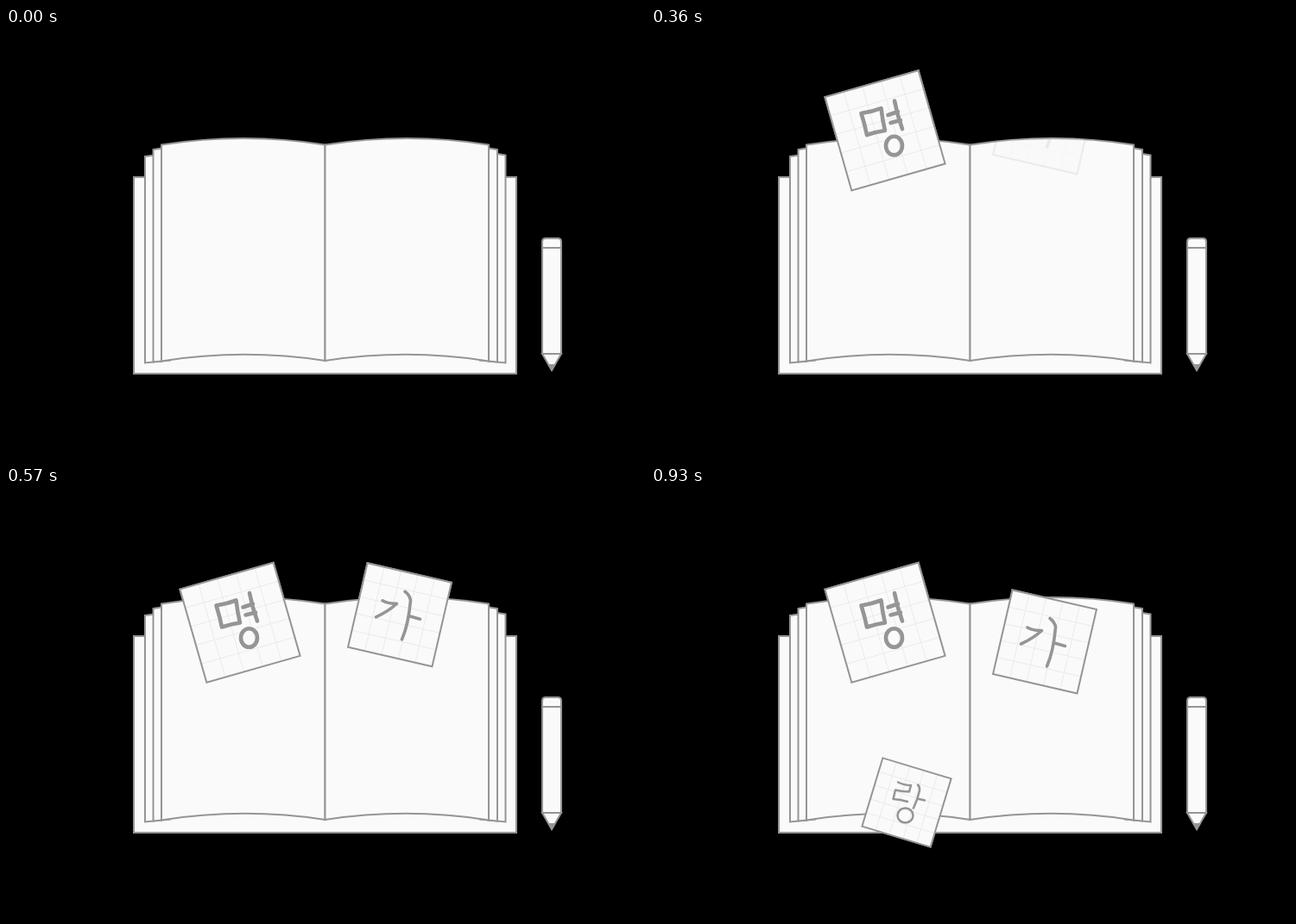
Recreate the animation shown at these times as an HTML page with a canvas. Size 740 by 500 pixels, loop 1620 ms.

```html
<!DOCTYPE html>
<html>
<head>
<meta charset="utf-8">
<style>
html, body { margin: 0; width: 100%; height: 100%; overflow: hidden; background: #000; }
canvas { display: block; }
</style>
</head>
<body>
<canvas id="stage" width="740" height="500"></canvas>
<script>
const ctx = document.getElementById('stage').getContext('2d');
const INK = '#959595', PAPER = '#fafafa', GRID = '#ebebeb';
const LOOP = 1620, STEP = 30, FADE = 110;

const easeIn = u => u ** 1.33;
const easeOut = u => Math.sin(u * Math.PI / 2);

// Each note drops by `drop` pixels between `from` and `to`; glyphs are in resting coordinates.
const notes = [
  { x: 271, y: 157.25, size: 112.6, turn: -15.95, from: 45, to: 570, drop: 78, ease: easeIn,
    pen: 4.6, glyph: 'M243.5 137.5Q256 135.5 266.5 131.5Q268 145 271 157.5Q260 159 250 162.5Q247.5 150 243.5 137.5Z' +
      'M282 123Q285 139 291 155.5M274.5 139.5L286 135.5M277.5 148.5L289 145.5' +
      'M272 175a9.5 10.8 0 1 0 19 0a9.5 10.8 0 1 0 -19 0' },
  { x: 456, y: 179.5, size: 100, turn: 13, from: 345, to: 925, drop: 73, ease: easeOut,
    pen: 3.6, glyph: 'M436 163Q443 167 452.5 166.5Q443 175.5 428.5 182' +
      'M462 152.5Q468 157 468.5 163Q466 191 458.5 208M467 181L479.5 184.5' },
  { x: 296, y: 366, size: 82.8, turn: 16.85, from: 590, to: 930, drop: 40, ease: easeOut,
    pen: 2.5, glyph: 'M286 342.5Q293 346 301 346L299 353.5Q291 353.5 283 351.5L280.5 362Q289 362.5 297 365' +
      'M309 345.5Q311.5 348 311 352Q309 362 304 372.5M308.5 361.5L317 363.5' +
      'M285.5 381a9 8.5 0 1 0 18 0a9 8.5 0 1 0 -18 0' }
];
for (const n of notes) n.path = new Path2D(n.glyph);

function shape(d, fill = PAPER) {
  const p = new Path2D(d);
  ctx.fillStyle = fill;
  ctx.fill(p);
  ctx.strokeStyle = INK;
  ctx.lineWidth = 2;
  ctx.stroke(p);
}

function drawBook() {
  shape('M148 173H591V401H148Z');
  shape('M161 149L180 146.5V386.5L161 388.5Z');
  shape('M578.5 147.5L559 144.5V386.5L578.5 388.5Z');
  shape('M170.5 141L190 138V385.5L170.5 387.5Z');
  shape('M569 141L549 138V385.5L569 387.5Z');
  shape('M180 135.5Q275 120.5 369.5 135.5V386Q275 371.5 180 386.5Z');
  shape('M369.5 135.5Q465 120.5 559 135.5V386.5Q465 371.5 369.5 386Z');
}

function drawPencil() {
  shape('M621 255V248Q621 244 625 244H639Q643 244 643 248V255Z');
  shape('M621 255H643V378H621Z');
  shape('M621 378H643L632 397Z');
  ctx.fillStyle = INK;
  ctx.fill(new Path2D('M627 390H637L632 398.5Z'));
}

function drawNote(n, t) {
  const u = Math.min(1, (t - n.from) / (n.to - n.from));
  const h = n.size / 2, cell = n.size / 5;
  ctx.save();
  ctx.translate(0, n.drop * (n.ease(u) - 1));
  ctx.save();
  ctx.translate(n.x, n.y);
  ctx.rotate(n.turn * Math.PI / 180);
  ctx.fillStyle = PAPER;
  ctx.fillRect(-h, -h, n.size, n.size);
  ctx.beginPath();
  for (let i = 1; i < 5; i++) {
    const p = i * cell - h;
    ctx.moveTo(p, -h); ctx.lineTo(p, h);
    ctx.moveTo(-h, p); ctx.lineTo(h, p);
  }
  ctx.strokeStyle = GRID;
  ctx.lineWidth = 1;
  ctx.stroke();
  ctx.strokeStyle = INK;
  ctx.lineWidth = 2;
  ctx.strokeRect(-h, -h, n.size, n.size);
  ctx.restore();
  ctx.lineWidth = n.pen;
  ctx.lineCap = ctx.lineJoin = 'round';
  ctx.strokeStyle = INK;
  ctx.stroke(n.path);
  ctx.restore();
}

function draw(t) {
  const alpha = n => Math.min(1, (t - n.from) / FADE);
  const shown = notes.filter(n => t > n.from);
  ctx.clearRect(0, 0, 740, 500);
  // Beyond the book a note is either solid or absent; over the book it fades in.
  for (const n of shown) if (alpha(n) >= 0.5) drawNote(n, t);
  drawBook();
  drawPencil();
  ctx.save();
  for (const n of shown) {
    ctx.globalAlpha = alpha(n);
    ctx.globalCompositeOperation = alpha(n) < 1 ? 'source-atop' : 'source-over';
    drawNote(n, t);
  }
  ctx.restore();
}

let start;
function tick(now) {
  start ??= now;
  const t = Math.max(0, now - start) % LOOP;
  draw(Math.floor(t / STEP) * STEP);
  requestAnimationFrame(tick);
}
draw(0);
requestAnimationFrame(tick);
</script>
</body>
</html>
```
